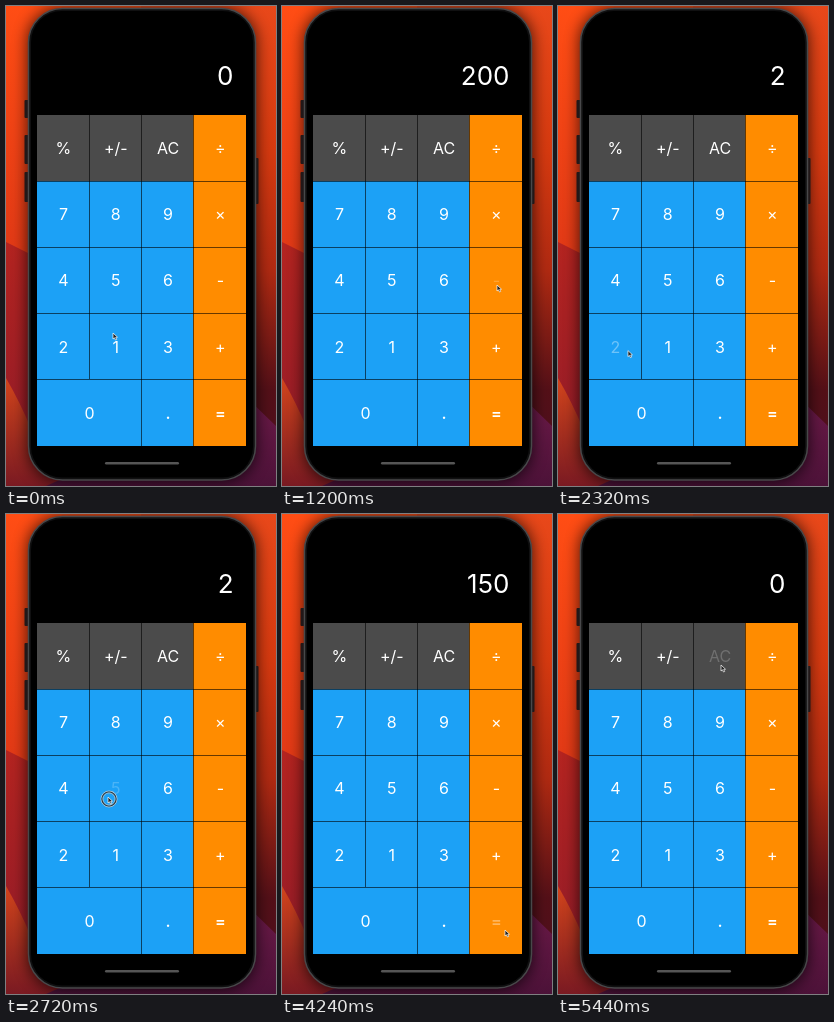
Write an HTML page that moves like this. It is 270x480 px and loops after 5520 ms.

```html
<!DOCTYPE html>
<html lang="en">
<head>
<meta charset="utf-8">
<title>Calculator</title>
<style>
  html, body { margin: 0; width: 100%; height: 100%; overflow: hidden; background: #000; }
  svg { display: block; width: 100vw; height: 100vh; }
  text { font-family: Inter, Roboto, sans-serif; fill: #fff; }
  .key { font-size: 16px; text-anchor: middle; }
  #display { font-size: 26px; text-anchor: end; }
</style>
</head>
<body>
<svg viewBox="0 0 270 480" preserveAspectRatio="none">
  <defs>
    <linearGradient id="left" x2="0" y2="1">
      <stop offset="0" stop-color="#ff4d14"/>
      <stop offset=".5" stop-color="#e23a16"/>
      <stop offset="1" stop-color="#d03018"/>
    </linearGradient>
    <linearGradient id="right" x2="0" y2="1">
      <stop offset="0" stop-color="#e8481a"/>
      <stop offset=".3" stop-color="#d63a10"/>
      <stop offset=".55" stop-color="#b02a12"/>
      <stop offset=".8" stop-color="#541018"/>
      <stop offset="1" stop-color="#4a1020"/>
    </linearGradient>
    <linearGradient id="crimson" x2="0" y2="1">
      <stop offset="0" stop-color="#b42420"/>
      <stop offset="1" stop-color="#8e1a2a"/>
    </linearGradient>
    <linearGradient id="ember" x2="0" y2="1">
      <stop offset="0" stop-color="#d2441c"/>
      <stop offset="1" stop-color="#7a1a22"/>
    </linearGradient>
    <linearGradient id="plum" x2="0" y2="1">
      <stop offset="0" stop-color="#6c1a48"/>
      <stop offset="1" stop-color="#4c1238"/>
    </linearGradient>
    <filter id="blur" x="-20%" y="-20%" width="140%" height="140%">
      <feGaussianBlur stdDeviation="8"/>
    </filter>
  </defs>

  <rect width="135" height="480" fill="url(#left)"/>
  <rect x="135" width="135" height="480" fill="url(#right)"/>
  <path d="M0 236L40 256V480H0Z" fill="url(#crimson)"/>
  <path d="M0 372Q14 396 26 425L60 480H0Z" fill="url(#ember)"/>
  <path d="M270 420L240 391 40 480H270Z" fill="url(#plum)"/>
  <rect x="22" y="2" width="228" height="474" rx="34" opacity=".75" filter="url(#blur)"/>

  <g fill="#221819">
    <rect x="18.500" y="94" width="4" height="18" rx="1"/>
    <rect x="18.500" y="129" width="4" height="29" rx="1"/>
    <rect x="18.500" y="166" width="4" height="30" rx="1"/>
    <rect x="249" y="152" width="3.500" height="46" rx="1"/>
  </g>
  <rect x="22.500" y="2.500" width="227" height="471.500" rx="34" fill="#101011" stroke="#48484a" stroke-width="1.500"/>
  <rect x="25" y="5" width="222" height="466.500" rx="31" fill="#000"/>
  <rect x="99" y="456" width="74" height="2.500" rx="1.250" fill="#555"/>

  <text id="display" x="227.500" y="79">0</text>
  <g id="keys"></g>
  <g id="pointer">
    <g id="ring" fill="none">
      <circle cx="1" cy="2" r="8" stroke="#ccc" stroke-width=".8"/>
      <circle cx="1" cy="2" r="7" stroke="#333" stroke-width="1.200"/>
      <circle cx="1" cy="2" r="6.100" stroke="#ccc" stroke-width=".7"/>
    </g>
    <path d="M0 0V6L1.500 4.800 2.500 7 3.700 6.500 2.700 4.400 4.500 4.200Z"
          fill="#222" stroke="#fff" stroke-width=".7"/>
  </g>
</svg>
<script>
const LOOP = 5520, STEP = 80, FADE = 400, DIM = 0.2;
const GRAY = '#4b4b4b', BLUE = '#1ca1f6', ORANGE = '#ff8c00';
const LEFT = 31, TOP = 109, CELL_W = 52.3, CELL_H = 66.2;
const rows = [
  ['%', '+/-', 'AC', '÷'],
  ['7', '8', '9', '×'],
  ['4', '5', '6', '-'],
  ['2', '1', '3', '+'],
  ['0', null, '.', '=']
];

// key, pressed, released, display after release
const clicks = [
  ['2', 240, 320, '2'],
  ['0', 480, 560, '20'],
  ['0', 720, 800, '200'],
  ['-', 1120, 1200, '200'],
  ['2', 2160, 2240, '2'],
  ['5', 2640, 2800, '25'],
  ['%', 3280, 3440, '50'],
  ['=', 4080, 4160, '150'],
  ['AC', 5280, 5440, '0']
];

// time, x, y of the pointer tip
const path = [
  [0, 107, 327], [240, 62, 343], [320, 62, 343],
  [480, 84, 410], [800, 84, 410],
  [1120, 215, 279], [1360, 215, 279],
  [2080, 64, 356], [2240, 64, 356],
  [2560, 102, 283], [2800, 102, 283],
  [3200, 62, 158], [3440, 62, 158],
  [4000, 223, 416], [4560, 223, 416],
  [5200, 163, 151], [LOOP, 163, 151]
];

const $ = id => document.getElementById(id);
const labels = {};

function add(tag, attrs) {
  const node = document.createElementNS('http://www.w3.org/2000/svg', tag);
  for (const name in attrs) node.setAttribute(name, attrs[name]);
  return $('keys').appendChild(node);
}

// Cell edges sit on whole pixels so the separators stay crisp.
const edgeX = c => Math.floor(LEFT + c * CELL_W);
const edgeY = r => Math.floor(TOP + r * CELL_H);
const line = (x, y, width, height) =>
  add('rect', { x, y, width, height, fill: '#000', opacity: 0.6 });

rows.forEach((row, r) => row.forEach((name, c) => {
  if (!name) return;
  const span = name === '0' ? 2 : 1;
  const x = edgeX(c), y = edgeY(r);
  const width = edgeX(c + span) - x, height = edgeY(r + 1) - y;
  add('rect', { x, y, width, height, fill: c === 3 ? ORANGE : r ? BLUE : GRAY });
  if (c) line(x, y, 1, height);
  if (r) line(x, y, width, 1);
  const label = add('text', {
    class: 'key',
    x: LEFT + (c + span / 2) * CELL_W + 0.3,
    y: TOP + (r + 0.5) * CELL_H + 5.8,
    'font-weight': name === '.' || name === '=' ? 600 : 400
  });
  label.textContent = name;
  labels[name] = label;
}));

function pointerAt(t) {
  const i = path.findIndex(p => p[0] > t);
  const [t0, x0, y0] = path[i - 1], [t1, x1, y1] = path[i];
  const k = (t - t0) / (t1 - t0), e = k * k * (3 - 2 * k);
  return [x0 + (x1 - x0) * e, y0 + (y1 - y0) * e];
}

function draw(now) {
  const t = Math.floor(now % LOOP / STEP) * STEP;
  let shown = '0', held = false;
  for (const name in labels) labels[name].setAttribute('opacity', 1);
  for (const [name, down, up, value] of clicks) {
    if (t < down) break;
    const fade = Math.max(0, Math.min(1, (t - up) / FADE));
    labels[name].setAttribute('opacity', DIM + (1 - DIM) * fade);
    if (t >= up) shown = value;
    else held = true;
  }
  $('display').textContent = shown;
  $('ring').setAttribute('visibility', held ? 'visible' : 'hidden');
  $('pointer').setAttribute('transform', `translate(${pointerAt(t)})`);
}

const start = performance.now();
function tick() {
  draw(performance.now() - start);
  requestAnimationFrame(tick);
}
tick();
</script>
</body>
</html>
```
